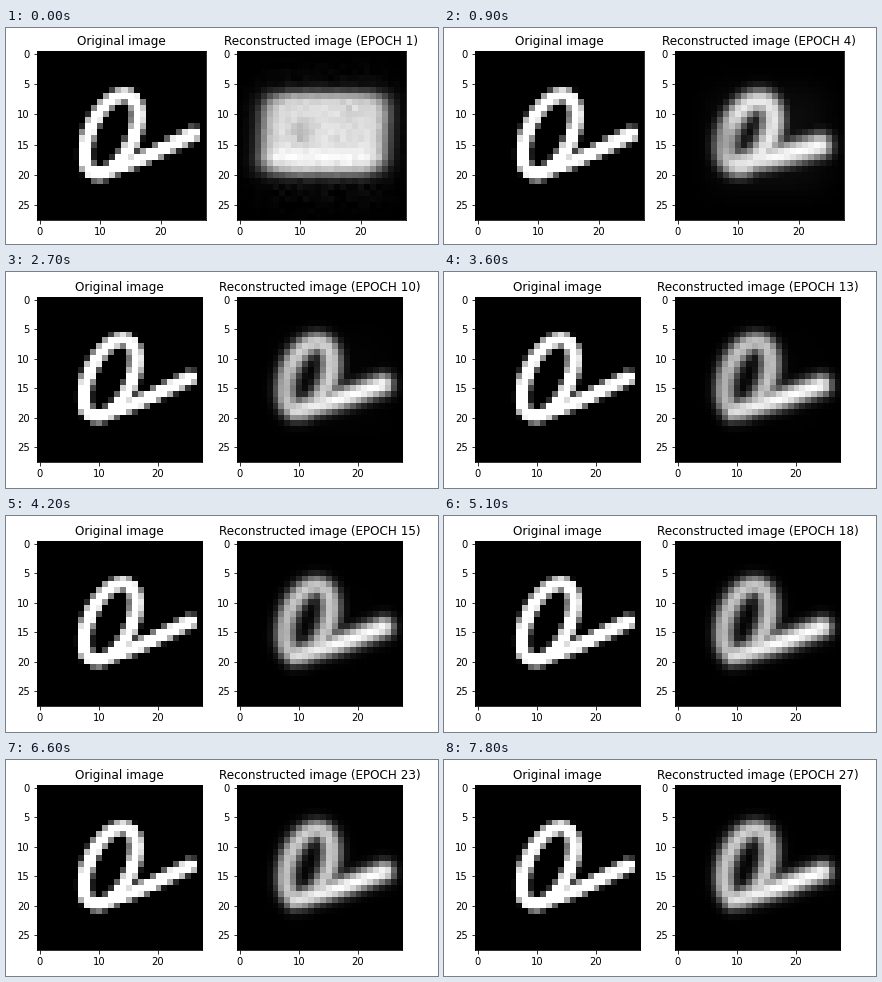
These frames come from a looping animation (432 by 216 pixels, 8000 ms). A matplotlib script:

```python
import numpy as np
import matplotlib.pyplot as plt
from matplotlib.animation import FuncAnimation

WIDTH, HEIGHT, DPI = 432, 216, 72
CELLS = 28
FRAME_MS, FRAMES, FRAMES_PER_EPOCH = 100, 80, 3
EPOCHS = -(-FRAMES // FRAMES_PER_EPOCH)

plt.rcParams["font.family"] = "DejaVu Sans"
COL, ROW = np.meshgrid(np.arange(CELLS), np.arange(CELLS))


def mix(a, b, t):
    return a + (b - a) * t


def sigmoid(x):
    return 1 / (1 + np.exp(-x))


def bump(x, y, rx, ry, power=2):
    return np.exp(-np.abs((COL - x) / rx) ** power - np.abs((ROW - y) / ry) ** power)


def distance(xs, ys):
    """Distance of every cell from a densely sampled curve."""
    return np.hypot(COL[..., None] - xs, ROW[..., None] - ys).min(axis=-1)


def loop_distance(x, y, rx, ry, slant):
    angle = np.linspace(0, 2 * np.pi, 240)
    return distance(x + rx * np.cos(angle) - slant * np.sin(angle),
                    y + ry * np.sin(angle))


def tail_distance(x0, y0, x1, y1, bow):
    s = np.linspace(0, 1, 160)
    return distance(mix(x0, x1, s), mix(y0, y1, s) + bow * np.sin(np.pi * s))


def sharp_digit():
    d = np.minimum(loop_distance(11.85, 13.35, 3.8, 6.5, 2.1),
                   tail_distance(9.8, 19.8, 25.4, 13.25, 0.35))
    return np.clip((1.15 - d) / 0.8 + 0.5, 0, 1)


def first_guess(rng):
    """The soft bright slab that comes before any digit shape."""
    lean = 0.06 * (13 - ROW)
    reach = (np.abs((COL - 14 - lean) / 10.3) ** 5 + np.abs((ROW - 13.2) / 6.7) ** 5) ** 0.2
    slab = sigmoid((1 - reach) / 0.075)
    shade = 0.87 + 0.1 * np.exp(-((ROW - 17) / 1.3) ** 2)
    shade -= 0.17 * bump(10.3, 13, 1.7, 2.2) + 0.06 * bump(18.5, 10, 2, 2)
    speckle = rng.normal(0, 0.02, COL.shape)
    halo = 0.08 * rng.random(COL.shape) * bump(14, 14, 11, 11, 4)
    return slab * (shade + speckle) + halo * (1 - slab)


def soft_digit(epoch, rng):
    # Training settles from a rough shape towards the digit
    t = 1 - np.exp(-max(epoch - 4, 0) / 5)
    sway = rng.normal(0, 0.08)
    loop = loop_distance(mix(11.9, 11.55, t) + sway, 13.1, 3.55,
                         mix(5.3, 5.9, t), mix(1.6, 1.4, t))
    tail = tail_distance(9.3, mix(18.1, 19.1, t), mix(23.5, 24.4, t),
                         mix(15.2, 14.2, t) + sway, 0.2)

    thickness, softness = mix(1.65, 1.4, t), mix(0.55, 0.48, t)
    gain = mix(0.93, 0.8, t) - mix(0.3, 0.05, t) * bump(8, 14.5, 2.2, 3.5)
    ring = (gain + rng.normal(0, 0.015)) * sigmoid((thickness - loop) / softness)
    stroke = sigmoid((thickness - tail) / softness)
    stroke *= mix(0.86, 1, np.clip((COL - 8) / 9, 0, 1))
    glow = 0.05 * (1 - t) * bump(15, 14, 10, 9, 4)
    return np.maximum(np.maximum(ring, stroke), glow)


def reconstruction(epoch):
    rng = np.random.default_rng(epoch)
    slab_share = max(0, (4 - epoch) / 3) ** 2
    image = mix(soft_digit(epoch, rng), first_guess(rng), slab_share)
    return image / image.max()


def place_axes(epoch):
    # A two-digit epoch widens the title, which leaves less room for the axes
    size = 169.0 if epoch < 10 else 165.2
    top = 107.6 - size / 2
    for ax, left in zip(axes, (30.8, 230.8)):
        ax.set_position([left / WIDTH, 1 - (top + size) / HEIGHT,
                         size / WIDTH, size / HEIGHT])


def update(frame):
    epoch = frame // FRAMES_PER_EPOCH + 1
    place_axes(epoch)
    pictures[1].set_data(reconstructions[epoch - 1])
    axes[1].set_title(f"Reconstructed image (EPOCH {epoch})", fontsize=12)
    return pictures


fig, axes = plt.subplots(1, 2, figsize=(WIDTH / DPI, HEIGHT / DPI), dpi=DPI,
                         facecolor="white")
reconstructions = [reconstruction(n + 1) for n in range(EPOCHS)]
pictures = [ax.imshow(sharp_digit(), cmap="gray", vmin=0, vmax=1,
                      interpolation="nearest", aspect="auto") for ax in axes]
for ax in axes:
    ax.set_xticks(range(0, CELLS, 10))
    ax.set_yticks(range(0, CELLS, 5))
    ax.tick_params(labelsize=10)
axes[0].set_title("Original image", fontsize=12)

anim = FuncAnimation(fig, update, frames=FRAMES, interval=FRAME_MS,
                     init_func=lambda: update(0), repeat=True, repeat_delay=0,
                     blit=False)
plt.show()
```
